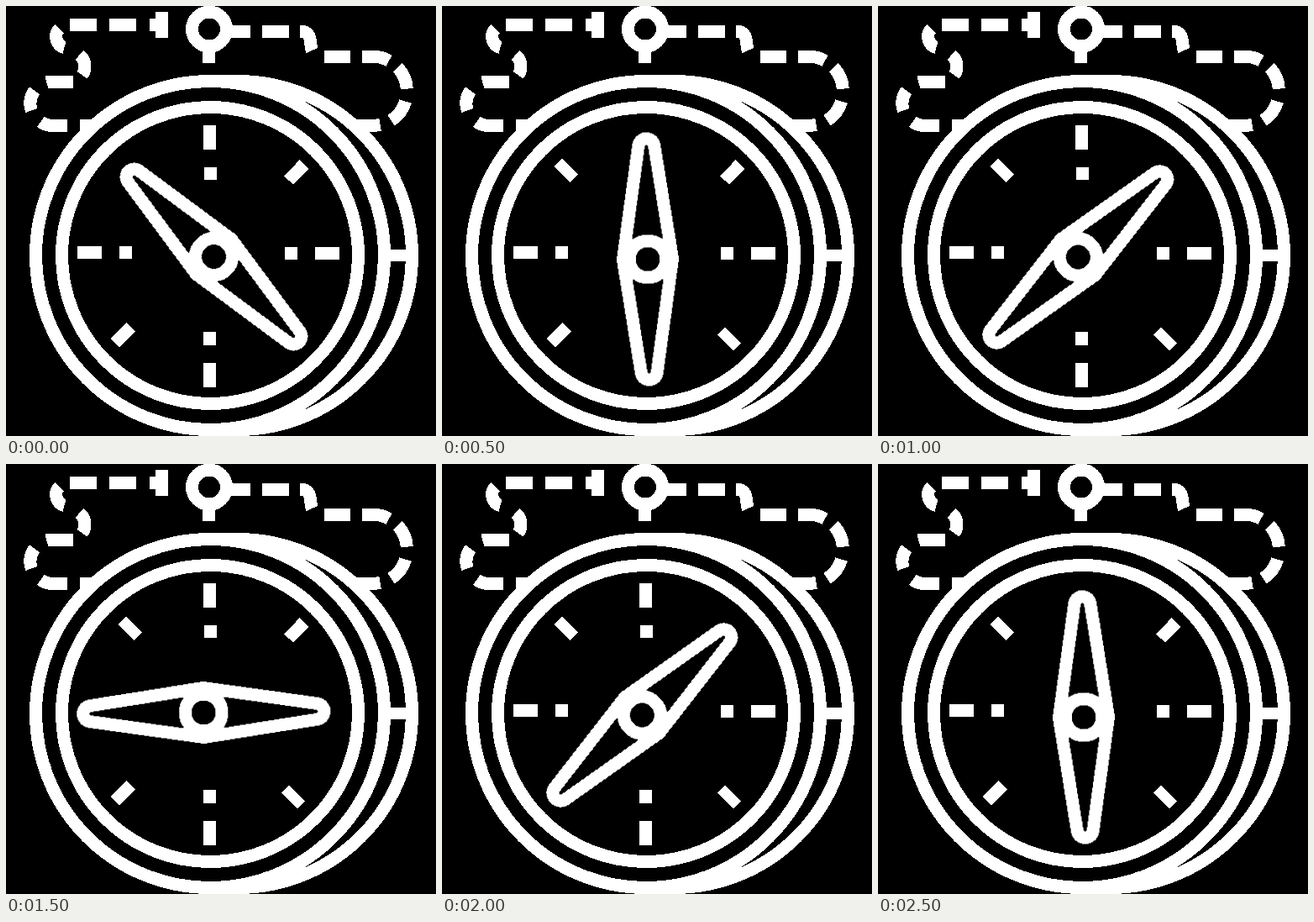
Recreate the animation shown at these times as an HTML page. Size 512x512 px, loop 3000 ms.

```html
<!DOCTYPE html>
<html lang="en">
<head>
<meta charset="utf-8">
<title>Compass</title>
<style>
  html, body { margin: 0; width: 100%; height: 100%; overflow: hidden; background: #000; }
  svg { display: block; width: 100vw; height: 100vh; shape-rendering: crispEdges; }
  .line { fill: none; stroke: #fff; stroke-width: 15; }
  .needle { fill: #000; stroke: #fff; stroke-width: 15; stroke-linejoin: round; }
  .needle, .ticks path { animation: 3s step-end infinite; }
  .needle { animation-name: swing; }
  .ticks .nw { animation-name: hide-nw; }
  .ticks .n { animation-name: hide-n; }
  .ticks .ne { animation-name: hide-ne; }
  .ticks .e { animation-name: hide-e; }

  @keyframes swing {
    0% { transform: translate(247.5px, 298.5px) rotate(-45deg); }
    16.6667%, 83.3333% { transform: translate(245px, 301.5px) rotate(-.7deg); }
    33.3333%, 66.6667% { transform: translate(238.3px, 299px) rotate(46.3deg); }
    50% { transform: translate(235.3px, 296px) rotate(89.4deg); }
    100% { transform: translate(247.5px, 298.5px) rotate(-45deg); }
  }
  /* The pair of marks under the needle disappears. */
  @keyframes hide-nw {
    0% { visibility: hidden; }
    16.6667%, 100% { visibility: visible; }
  }
  @keyframes hide-n {
    0%, 33.3333%, 100% { visibility: visible; }
    16.6667%, 83.3333% { visibility: hidden; }
  }
  @keyframes hide-ne {
    0%, 50%, 83.3333%, 100% { visibility: visible; }
    33.3333%, 66.6667% { visibility: hidden; }
  }
  @keyframes hide-e {
    0%, 66.6667%, 100% { visibility: visible; }
    50% { visibility: hidden; }
  }
</style>
</head>
<body>
<svg viewBox="0 0 512 512">
  <g class="line">
    <!-- chain, left -->
    <path d="M155 22.5H123M108 22.5H76M171 22.5H180M185.5 7V38"/>
    <path d="M63.5 27A13.5 13.5 0 0 0 69.5 49.5M87.6 58.2A18 18 0 0 1 90.7 82.3"/>
    <path d="M80 90H55A26 26 0 0 0 48.3 90.9M34 100.7A26 26 0 0 0 30.4 124.5M41.2 138A26 26 0 0 0 55 142.5H73M88 142.5H106"/>
    <!-- chain, right -->
    <path d="M267 30H291M305 30H337M350 30C366 30 361 45.5 364.4 53M379 60H410"/>
    <path d="M424 60H436A41.5 41.5 0 0 1 456.1 65.2M466.4 73.2A41.5 41.5 0 0 1 477.4 98.6M475.7 113.6A41.5 41.5 0 0 1 458.6 136.3M445.6 141.5Q440 142.5 435 142.5H418"/>
    <!-- ring and stem -->
    <circle cx="242" cy="27.5" r="20.5"/>
    <path d="M241.5 52V68"/>
    <!-- case -->
    <circle cx="243" cy="297" r="207.5"/>
    <circle cx="243" cy="297" r="176.5"/>
    <path d="M243 89.5H276A207.5 207.5 0 0 1 276 504.5H243"/>
    <path d="M456 297H478" stroke-width="14"/>
  </g>
  <g class="line ticks">
    <path class="n" d="M242.5 142V171M243 192V207M242 388V403.5M242 425V454"/>
    <path class="e" d="M85 293.5H114M135 293.5H150M332 294.5H347M368 294.5H397"/>
    <path class="ne" d="M336.5 207.5L355 188.5M129.5 401.5L148.5 382.5"/>
    <path class="nw" stroke-width="13" d="M138.5 186.5L157.5 205.5M332.5 387L351.5 406"/>
  </g>
  <g class="needle">
    <path d="M-29.5 0L-9.4 -135.5A9.5 9.5 0 0 1 9.4 -135.5L29.5 0L9.4 135.5A9.5 9.5 0 0 1 -9.4 135.5Z"/>
    <circle r="22"/>
  </g>
</svg>
</body>
</html>
```
